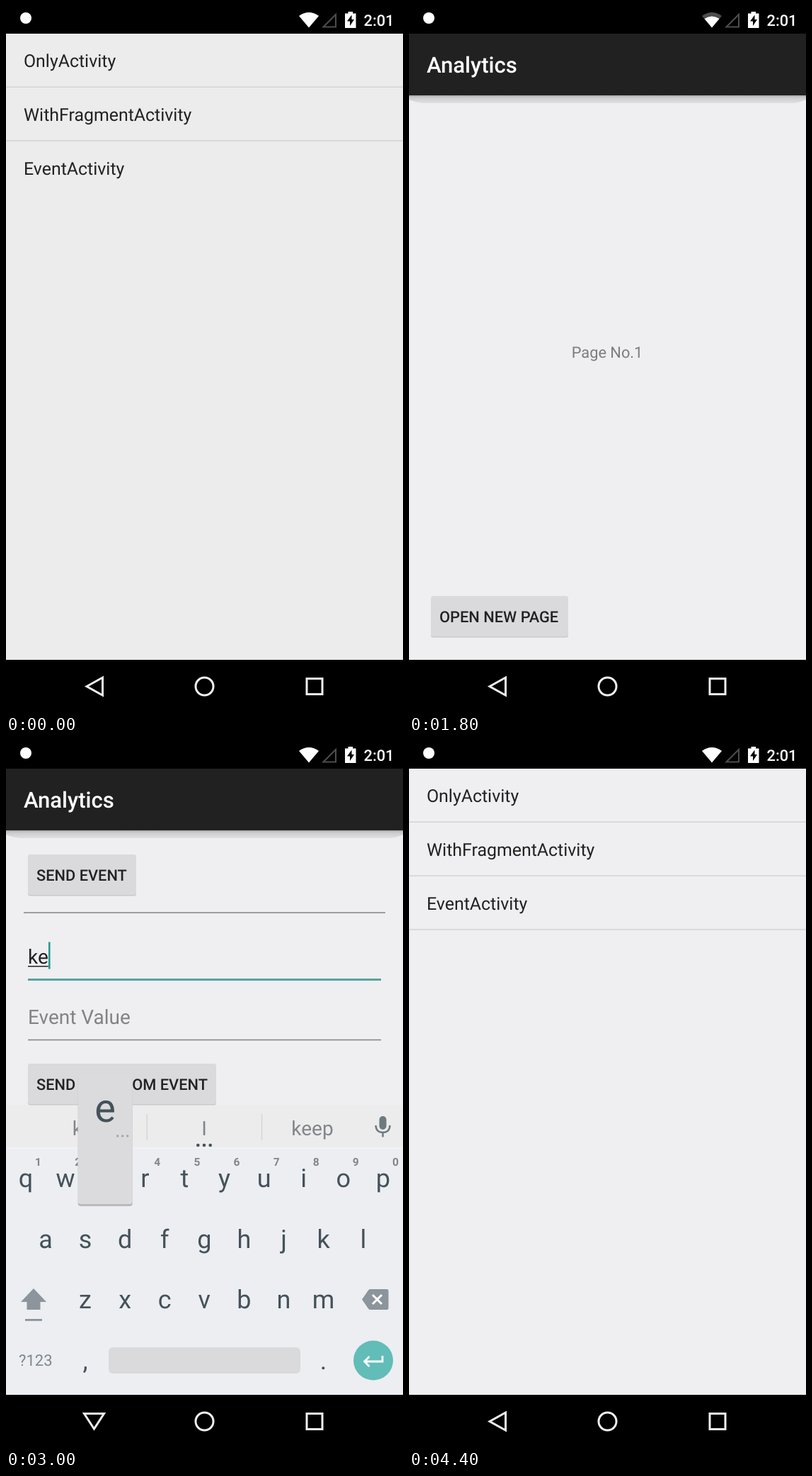
Write an HTML page that moves like this. It is 561 by 997 pixels and loops after 4.6 s.

```html
<!DOCTYPE html>
<html lang="en">
<head>
<meta charset="utf-8">
<title>Analytics demo</title>
<style>
html, body { margin: 0; width: 100%; height: 100%; overflow: hidden; background: #000; }
svg { display: block; width: 100%; height: 100%; }
text { font-family: Roboto, sans-serif; white-space: pre; text-rendering: geometricPrecision; }
</style>
</head>
<body>
<svg id="stage" viewBox="0 0 561 997">
  <defs>
    <linearGradient id="shadow" x1="0" y1="0" x2="0" y2="1">
      <stop offset="0" stop-color="#a9a9aa"/>
      <stop offset=".3" stop-color="#cccbcd"/>
      <stop offset="1" stop-color="#e0dfe1"/>
    </linearGradient>
  </defs>
  <g id="screen"></g>
</svg>
<script>
const STEP = 200;
const PAGE = '#efeef0', INK = '#222', HINT = '#838284', TEAL = '#249a92';
const KEY = '#44525a', SOFT = '#8b959b';
const screen = document.getElementById('screen');
const ruler = document.createElement('canvas').getContext('2d');

const rect = (x, y, w, h, fill, rx = 0) =>
  `<rect x="${x}" y="${y}" width="${w}" height="${h}" rx="${rx}" fill="${fill}"/>`;
const shape = (d, fill) => `<path d="${d}" fill="${fill}"/>`;
const stroke = (d, color, width = 3) =>
  `<path d="${d}" fill="none" stroke="${color}" stroke-width="${width}"/>`;
const circle = (x, y, r, fill) => `<circle cx="${x}" cy="${y}" r="${r}" fill="${fill}"/>`;
const text = (s, x, y, size, fill, weight = 400, anchor = 'start') =>
  `<text x="${x}" y="${y}" font-size="${size}" fill="${fill}" font-weight="${weight}" text-anchor="${anchor}">${s}</text>`;
const centered = (s, x, y, size, fill, weight) => text(s, x, y, size, fill, weight, 'middle');
const dots = (x, y, gap, r, fill) => [-gap, 0, gap].map(d => circle(x + d, y, r, fill)).join('');

function textWidth(s, size) {
  ruler.font = `${size}px Roboto, sans-serif`;
  return ruler.measureText(s).width;
}

function statusBar(weakWifi) {
  const fan = 'M428 30.5L414 14Q428 4 442 14Z';
  return rect(0, 0, 561, 39, '#000') +
    circle(28, 17, 8, '#fff') +
    shape(fan, weakWifi ? '#4d4d4d' : '#fff') +
    (weakWifi ? shape('M428 30.5L417.5 18Q428 11 438.5 18Z', '#fff') : '') +
    stroke('M448.5 29.5L466 12V29.5Z', '#4d4d4d', 2) +
    shape('M479 10.5H483.5V8H490V10.5H494.5V31H479Z', '#fff') +
    shape('M488.5 12.5L482 21.5H486V28L492 19H488.5Z', '#000') +
    text('2:01', 505.5, 28, 21.8, '#fff', 500);
}

function navBar(keyboardOpen) {
  const back = keyboardOpen ? 'M110.5 948.5H138.5L124.5 970Z' : 'M114 959.5L136.5 947V972Z';
  return rect(0, 922, 561, 75, '#000') +
    stroke(back, '#eee') +
    '<circle cx="280.5" cy="959.5" r="12.5" fill="none" stroke="#eee" stroke-width="3"/>' +
    stroke('M425 948.5H447V970.5H425Z', '#eee');
}

function actionBar() {
  return shape('M0 126H561V132Q551 137 540 137H20Q9 136 0 132Z', 'url(#shadow)') +
    rect(0, 39, 561, 87, '#212121') +
    text('Analytics', 25, 94, 31.1, '#fff', 500);
}

function button(label, y, width) {
  return rect(31, y + 1.5, width, 57, '#c9c9cb', 3) +
    rect(31, y, width, 57, '#dadadc', 3) +
    text(label, 43, y + 36.5, 21.8, INK, 500);
}

function listPage({ first }) {
  const names = ['OnlyActivity', 'WithFragmentActivity', 'EventActivity'];
  return rect(0, 39, 561, 883, first ? '#ececec' : PAGE) +
    names.map((name, i) =>
      text(name, 25, 86 + i * 76, 24.9, INK) +
      (first && i === 2 ? '' : rect(0, 113.5 + i * 75.8, 561, 1.5, '#d4d3d5'))).join('');
}

function numberPage({ number }) {
  return rect(0, 39, 561, 883, PAGE) + actionBar() +
    centered('Page No.' + number, 280, 495.5, 21.8, '#7d7c7e') +
    button('OPEN NEW PAGE', 832, 194);
}

function field(hint, value, y, { focused, cursor, composing, settling }) {
  const width = textWidth(value, 28);
  let out = text(value || hint, 31, y, 28, value ? INK : HINT);
  if (composing) out += rect(31, y + 3.5, width, 1.5, INK);
  if (cursor) out += rect(31.2 + width, y - 30, 2.6, 38, TEAL);
  if (settling) return out + rect(31, y + 21.5, 499, 2, '#7f9a99');
  return out + (focused ? rect(31, y + 21.5, 499, 3, '#52a5a0') : rect(31, y + 21.7, 499, 1.6, '#858486'));
}

function keyPopup(letter) {
  const row = KEY_ROWS.findIndex(r => r.letters.includes(letter));
  const x = keyX(row, KEY_ROWS[row].letters.indexOf(letter));
  const top = 470 + row * 85.5;
  return rect(x - 38.5, top + 3, 77, 183, '#b9b9bb', 4) +
    rect(x - 38.5, top, 77, 183, '#dbdbdd', 4) +
    centered(letter, x, top + 67, 56, KEY) +
    dots(x + 24.5, top + 87, 7, 1.7, '#a2a6aa');
}

const KEY_ROWS = [
  { letters: 'qwertyuiop', x: 28 },
  { letters: 'asdfghjkl', x: 56 },
  { letters: 'zxcvbnm', x: 112 }
];
const keyX = (row, i) => KEY_ROWS[row].x + i * 56.1;

function keyboard({ words, popup }) {
  let out = rect(0, 514, 561, 60, '#ececec') + rect(0, 574, 561, 348, '#eceef2') +
    rect(0, 573.5, 561, 1.5, '#f4f5f7');
  words.forEach((word, i) => out += centered(word, 127 + i * 153, 556, 28, '#82868b'));
  out += rect(198.5, 526, 1.5, 37, '#d6d6d8') + rect(360.8, 526, 1.5, 37, '#d6d6d8') +
    dots(280, 570, 8.7, 2.3, KEY);
  // microphone
  out += rect(527.5, 529, 10, 19, '#6d7a80', 5) +
    stroke('M522.5 542Q523 552 532.5 552T542.5 542M532.5 552V558.5', '#6d7a80', 2.5);
  KEY_ROWS.forEach(({ letters }, row) => [...letters].forEach((letter, i) => {
    out += centered(letter, keyX(row, i), 629 + row * 85.5, 36, KEY);
    if (row === 0) out += centered((i + 1) % 10, keyX(row, i) + 17.5, 598.5, 15.5, '#82868b', 700);
  }));
  // shift, backspace
  out += shape('M39 772L57 791H48.5V802H29.5V791H21Z', SOFT) + rect(27, 815, 24, 2.8, SOFT) +
    shape('M503 787.5L512 774.5Q513 773 515 773H538Q540.5 773 540.5 775.5V799.5Q540.5 802 538 802H515Q513 802 512 800.5Z', SOFT) +
    stroke('M518 781L531 794M531 781L518 794', '#fff');
  out += text('?123', 18, 881, 22, '#7f888e') +
    centered(',', 112, 886, 36, KEY) + centered('.', 448.5, 886, 36, KEY) +
    rect(145, 855, 271, 37, '#dadadc', 6);
  // enter
  out += circle(519, 873.5, 28, '#62bcb8') +
    stroke('M532 867V875H507M513.5 868L506.5 875L513.5 882', '#fff', 2.8);
  return out + (popup ? keyPopup(popup) : '');
}

function eventPage(s) {
  const onValue = s.focus === 'value';
  const { cursor = true, composing, settling } = s;
  const active = { focused: true, cursor, composing, settling };
  return rect(0, 39, 561, 883, PAGE) + actionBar() +
    button('SEND EVENT', 160, 153) +
    rect(25, 241.3, 511, 1.6, '#8b8a8c') +
    field('Event Key', s.key || '', 313.5, onValue ? {} : active) +
    field('Event Value', s.value || '', 399, onValue ? active : {}) +
    button('SEND A CUSTOM EVENT', 455, 266) +
    (s.words ? keyboard(s) : '');
}

const list = { page: listPage, weak: true };
const numbered = number => ({ page: numberPage, number, weak: true });
const form = props => ({ page: eventPage, ...props });
const idleWords = ['The', 'I', 'Thanks'];
const opening = { page: listPage, first: true };
const coded = form({ focus: 'value', key: 'key', value: 'code', composing: true, words: ['codec', 'codes', 'coded'] });

// One entry per 200 ms
const timeline = [
  opening, opening, opening,
  { ...opening, weak: true },
  list,
  ...[1, 2, 3, 2, 1].map(numbered),
  list,
  form({ weak: true, settling: true }),
  form({ weak: true, cursor: false }),
  form({ cursor: false, words: idleWords }),
  form({ key: 'k', composing: true, words: ['know', 'I', 'Thanks'] }),
  form({ key: 'ke', composing: true, words: ['know', 'I', 'keep'], popup: 'e' }),
  form({ key: 'key', composing: true, words: ['keyed', 'keys', 'Keys'] }),
  form({ focus: 'value', key: 'key', words: idleWords }),
  form({ focus: 'value', key: 'key', value: 'co', composing: true, words: ['could', 'come', 'call'], popup: 'd' }),
  coded, coded,
  form({ focus: 'value', key: 'key', value: 'code', cursor: false }),
  { page: listPage }
];

let shown = -1;
function draw(now) {
  const index = Math.floor(now / STEP) % timeline.length;
  if (index !== shown) {
    shown = index;
    const state = timeline[index];
    screen.innerHTML = state.page(state) + statusBar(state.weak) + navBar(!!state.words);
  }
  requestAnimationFrame(draw);
}
draw(performance.now());
</script>
</body>
</html>
```
